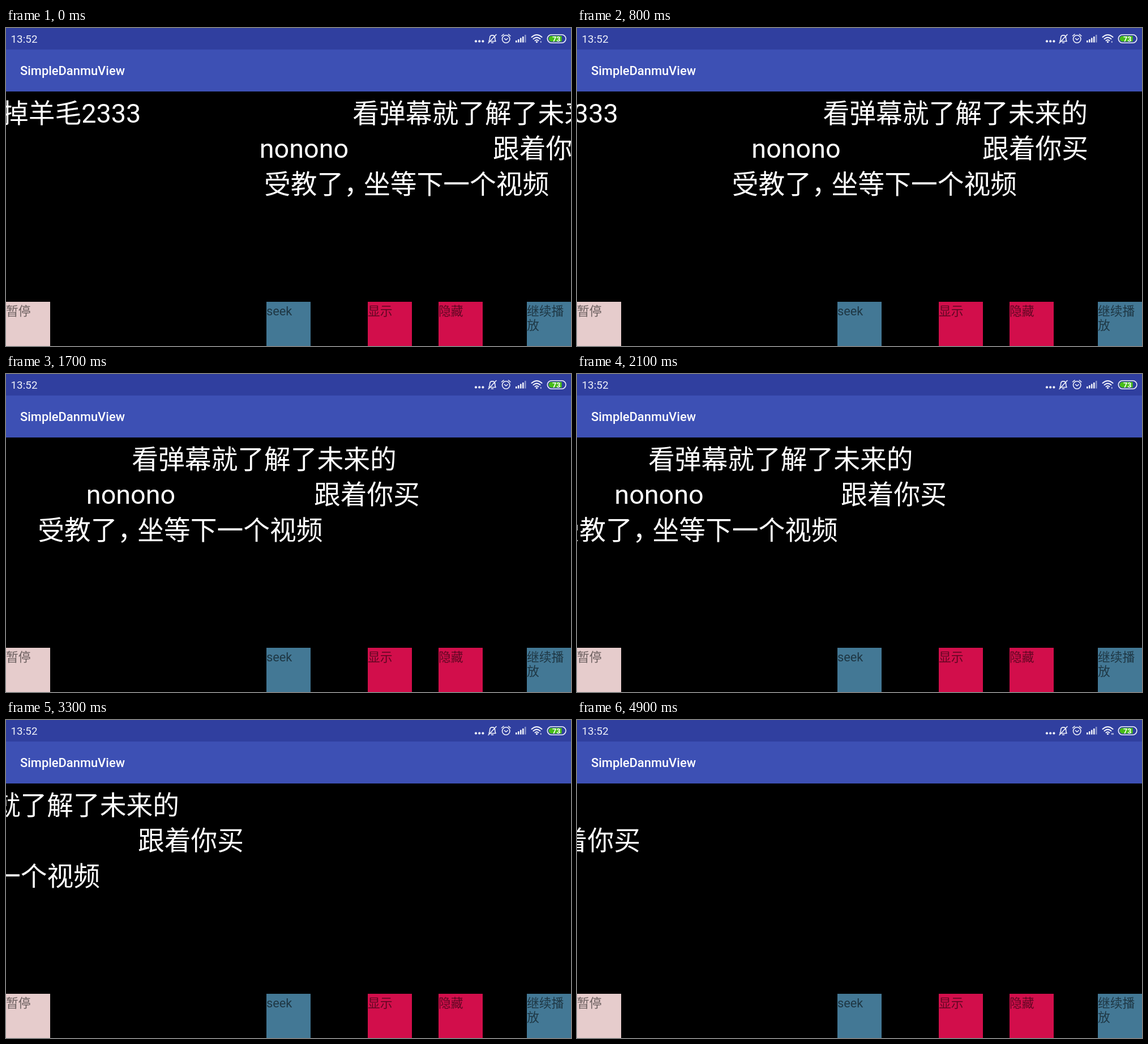
An HTML page with a canvas for the animation above (5 s loop, 998 by 561 pixels).

```html
<!DOCTYPE html>
<html lang="zh-CN">
<head>
<meta charset="utf-8">
<title>SimpleDanmuView</title>
<style>
html, body { margin: 0; width: 100%; height: 100%; overflow: hidden; background: #000; }
canvas { display: block; }
</style>
</head>
<body>
<canvas id="stage" width="998" height="561"></canvas>
<script>
const ctx = document.getElementById('stage').getContext('2d');
const FONTS = 'Roboto, "Noto Sans CJK SC DemiLight", "Noto Sans CJK SC", "Noto Sans CJK", sans-serif';
const LOOP = 5000, STEP = 100;

// Distance travelled by a comment of speed 1: [ms, px]
const TRAVEL = [[0, 0], [400, 66], [1200, 222], [1700, 316], [2500, 472], [3300, 627], [4900, 935]];

// Pieces: [text, offset of its ink from x]
const COMMENTS = [
  { x: 236, y: 166.5, speed: 1.15, right: true, parts: [['掉羊毛2333', 0]] },
  { x: 613.2, y: 166.5, speed: 1.234, parts: [['看弹幕就了解了未来的', 0]] },
  { x: 450.7, y: 229, speed: 0.968, parts: [['nonono', 0]] },
  { x: 861, y: 229, speed: 1, parts: [['跟着你买', 0]] },
  { x: 458, y: 291.5, speed: 1.265, parts: [['受教了', 0], ['，', 145], ['坐等下一个视频', 175]] }
];

const BUTTONS = [
  [0, '#e6cccc', '暂停'],
  [460, '#437895', 'seek'],
  [639, '#d20e4b', '显示'],
  [764, '#d20e4b', '隐藏'],
  [920, '#437895', '继续播', '放']
];

function rect(color, x, y, w, h) {
  ctx.fillStyle = color;
  ctx.fillRect(x, y, w, h);
}

function label(text, x, y, size, color, weight = 400) {
  ctx.font = `${weight} ${size}px ${FONTS}`;
  ctx.fillStyle = color;
  ctx.fillText(text, x, y);
}

function stroke(d, width = 1.6) {
  ctx.lineWidth = width;
  ctx.stroke(new Path2D(d));
}

function travel(t) {
  let i = 1;
  while (i < TRAVEL.length - 1 && t > TRAVEL[i][0]) i++;
  const [t0, d0] = TRAVEL[i - 1], [t1, d1] = TRAVEL[i];
  return d0 + (d1 - d0) * (t - t0) / (t1 - t0);
}

function drawComment(c, dist) {
  ctx.font = `46.75px ${FONTS}`;
  ctx.fillStyle = '#fff';
  for (const [text, dx] of c.parts) {
    const ink = ctx.measureText(text);
    const shift = c.right ? -ink.actualBoundingBoxRight : ink.actualBoundingBoxLeft;
    ctx.fillText(text, c.x + dx + shift - dist * c.speed, c.y);
  }
}

function drawStatus(t) {
  label('13:52', 8.5, 26, 18.9, '#f0f2fa');
  ctx.fillStyle = ctx.strokeStyle = '#f0f2fa';
  ctx.lineCap = ctx.lineJoin = 'round';
  for (const x of [830, 836.2, 842.4]) {
    ctx.beginPath();
    ctx.arc(x, 23.4, 2.1, 0, 7);
    ctx.fill();
  }
  // muted bell
  stroke('M853 23.5H865C863.5 21.5 863.8 19 863.6 17C863 11.5 855 11.5 854.6 17C854.4 19.5 854.5 21.5 853 23.5M857.5 26H860.5M866 11.5L852 26.5');
  // alarm clock
  stroke('M876.5 19.5a6.7 6.7 0 1 0 13.4 0a6.7 6.7 0 1 0-13.4 0M880.5 18.5L883.2 21L886.2 18.5M875.5 14L879 11.2M887.5 11.2L891 14');
  // signal
  [3.5, 5.5, 8, 10.5, 13.5].forEach((h, i) =>
    rect(i < 4 ? '#f0f2fa' : '#8791c8', 900 + i * 4, 25.5 - h, 2.6, h));
  // wifi
  stroke('M928.5 16Q937.5 8 946.5 16M931.5 19.3Q937.5 14 943.5 19.3M934.5 22.3Q937.5 19.8 940.5 22.3', 2);
  ctx.fillStyle = '#f0f2fa';
  ctx.beginPath();
  ctx.arc(937.5, 24.6, 1.7, 0, 7);
  ctx.fill();
  rect('#c5cbe8', 944, 23, 1.5, 3);
  if (t >= 3700) rect('#c5cbe8', 946.2, 23, 1.5, 3);
  // battery
  ctx.lineWidth = 1.6;
  ctx.beginPath();
  ctx.roundRect(956.3, 11.8, 32.6, 14.4, 7.2);
  ctx.stroke();
  ctx.fillStyle = '#46bd18';
  ctx.beginPath();
  ctx.roundRect(958.6, 14, 23, 10, [5, 1, 1, 5]);
  ctx.fill();
  label('73', 965, 23.6, 12.5, '#fff', 700);
}

function draw(t) {
  rect('#000', 0, 0, 998, 561);
  rect('#303f9f', 0, 0, 998, 38);
  rect('#3d50b4', 0, 38, 998, 74);
  drawStatus(t);
  label('SimpleDanmuView', 25, 83, 21.9, '#fff', 500);
  const dist = travel(t);
  COMMENTS.forEach(c => drawComment(c, dist));
  for (const [x, color, ...lines] of BUTTONS) {
    rect(color, x, 483, 78, 78);
    lines.forEach((line, i) => label(line, x, 506.5 + i * 25.5, 21.8, 'rgba(0,0,0,.54)'));
  }
}

function tick() {
  draw(Math.floor(performance.now() % LOOP / STEP) * STEP);
  requestAnimationFrame(tick);
}
tick();
</script>
</body>
</html>
```
